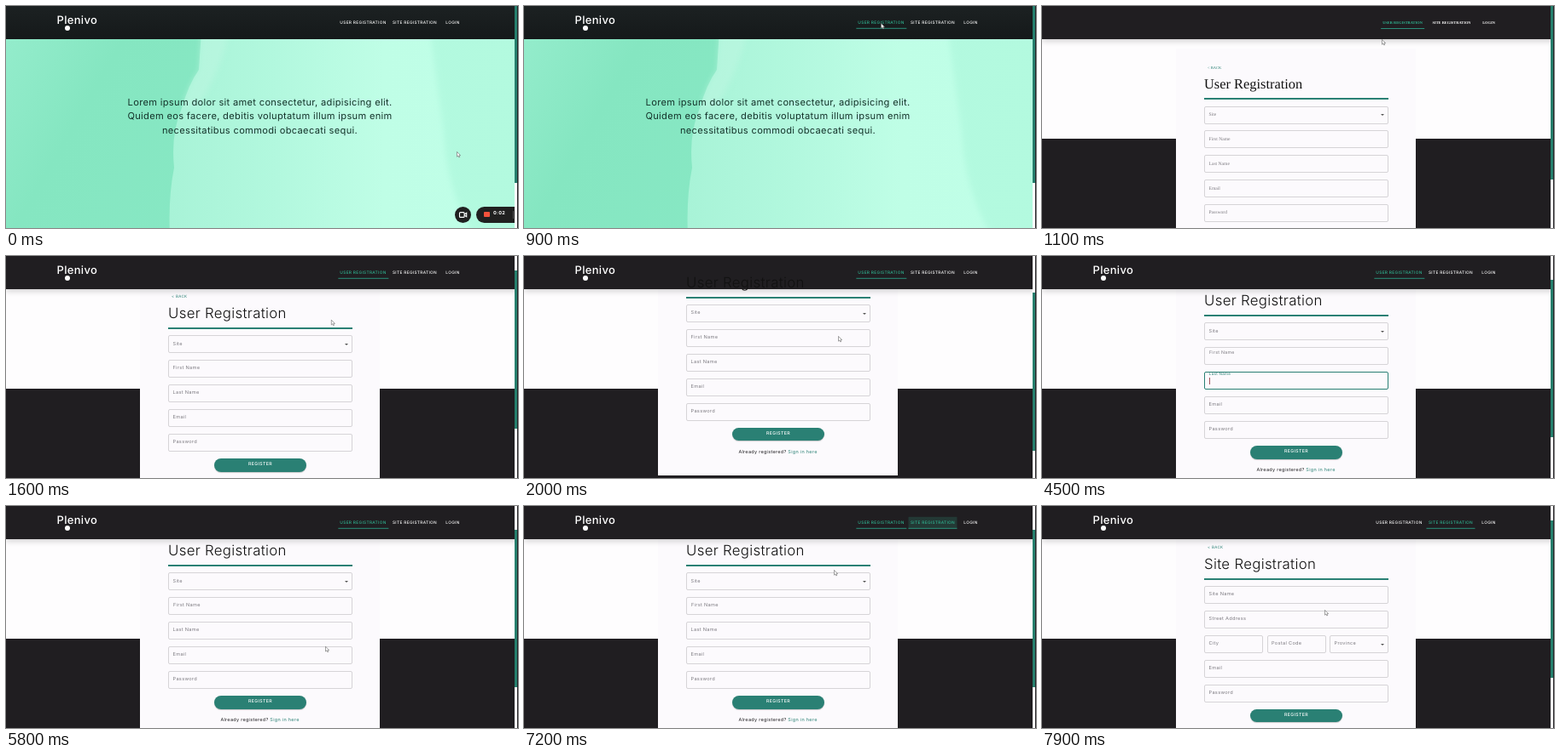
Write an HTML page that moves like this. It is 600 by 261 pixels and loops after 8000 ms.

```html
<!DOCTYPE html>
<html lang="en">
<head>
<meta charset="utf-8">
<title>Registration walkthrough</title>
<style>
  html, body { margin: 0; width: 100%; height: 100%; overflow: hidden; }
  #stage {
    position: relative; width: 600px; height: 261px; overflow: hidden;
    font-family: Inter, sans-serif; letter-spacing: .02em; color: #1c1b1d;
    text-rendering: geometricPrecision;
    background: linear-gradient(#fefdfe 156px, #201e21 156px);
  }
  #stage * { position: absolute; box-sizing: border-box; }
  .t { white-space: nowrap; line-height: 1; transform: translateY(-50%); }
  .mid { transform: translate(-50%, -50%); }
  #home, #home svg { inset: 0; }
  #home .t { left: 297.5px; font-size: 11.1px; color: #14332a; }
  .page { left: 0; top: 0; width: 600px; }
  .card { left: 157px; top: 50px; width: 281px; height: 268px; background: #fcfafd; }
  .back { left: 194px; top: 73px; font-size: 4.5px; color: #2a8074; }
  .title { left: 190px; font-size: 16.8px; font-weight: 300; color: #111; }
  .rule { left: 190px; top: 108px; width: 215.5px; height: 2px; background: #2a8074; }
  .field { height: 21px; border: 1px solid #d6d4d7; border-radius: 2px; }
  .label { left: 3.5px; top: 10.2px; padding: 0 1px; font-size: 5.6px; color: #7d7b80;
           transform-origin: 0 50%; }
  .arrow { right: 4.5px; top: 8.7px; border: 2px solid transparent; border-top-color: #555; }
  .caret { left: 4.5px; top: 6px; width: 1px; height: 7.5px; background: #a0525c; }
  .field.on { border-color: #2a8074; }
  .field.on .label { color: #2a8074; }
  .button { left: 244px; width: 108px; height: 15.5px; border-radius: 8px;
            background: #2a8074; box-shadow: 0 1px 1px #0003; }
  .button .t { left: 50%; top: 50%; font-size: 5.25px; font-weight: 500; color: #fff; }
  .signin { left: 297.5px; top: 292px; font-size: 5.45px; }
  .signin span { position: static !important; color: #2a8074; }
  #menu { left: 190px; top: 100px; width: 216px; height: 6px; background: #fff;
          border-radius: 1px; box-shadow: 0 2px 4px #0006; }
  #header { left: 0; top: 0; width: 600px; height: 39px; background: #201e21;
            box-shadow: 0 2px 7px #0003; }
  #header.dark { background: linear-gradient(#1c2122, #15191a); box-shadow: none; }
  #logo { inset: 0; color: #fff; }
  #logo .t { left: 59.5px; top: 16.5px; font-size: 13px; font-weight: 500; }
  #logo i { left: 69px; top: 22.5px; width: 6px; height: 6px; border-radius: 50%; background: #fff; }
  .nav { top: 20px; padding: 4px 2.5px 3.6px; font-size: 4.8px; font-weight: 500; color: #fff;
         border-bottom: 1px solid transparent; border-top: 1px solid transparent; }
  .nav.on { color: #2fb592; border-bottom-color: #2a8e78; }
  .nav.tint { background: #2fa38633; }
  .serif { font-family: "Liberation Serif", serif !important; letter-spacing: 0 !important; }
  .serif .nav { font-size: 4.4px; font-weight: 700; }
  .serif .title { font-size: 16.4px; font-weight: 400; }
  #track { left: 595.5px; bottom: 0; width: 3.5px; background: #fdfdfd; }
  #edge { left: 599px; top: 0; width: 1px; height: 261px; background: #252326; }
  #thumb { left: 0; width: 100%; background: #26806e; }
  #cam { left: 526px; top: 235.5px; width: 19px; height: 19px; border-radius: 50%; background: #202020; }
  #rec { left: 551px; top: 235.5px; width: 44.5px; height: 19px; border-radius: 9.5px 0 0 9.5px; background: #202020; }
  #rec i { left: 9px; top: 6.3px; width: 6.6px; height: 6.6px; border-radius: 1px; background: #f4523c; }
  #rec b { left: 20px; top: 9.9px; font-size: 5.6px; color: #fff; }
  #rec u { left: 43px; top: 5px; width: 1px; height: 9px; background: #555; }
  #pointer { left: 0; top: 0; width: 6px; height: 8px; overflow: visible; }
</style>
</head>
<body>
<div id="stage">
  <div id="home">
    <svg viewBox="0 0 600 261">
      <defs>
        <linearGradient id="deep" x2="1" y2=".25">
          <stop stop-color="#96edcd"/><stop offset=".25" stop-color="#85e6c1"/><stop offset="1" stop-color="#8aeac7"/>
        </linearGradient>
        <linearGradient id="pale">
          <stop stop-color="#a8f3d7"/><stop offset=".3" stop-color="#b2f8de"/>
          <stop offset=".6" stop-color="#bffee6"/><stop offset="1" stop-color="#c0ffe8"/>
        </linearGradient>
        <filter id="soft"><feGaussianBlur stdDeviation="3"/></filter>
      </defs>
      <rect width="600" height="261" fill="url(#deep)"/>
      <path d="M229 30 L226 75 Q214 92 206 120 Q193 150 197 190 Q190 225 192 270 H610 V30 Z" fill="url(#pale)"/>
      <path d="M229 30 L226 75 Q214 92 206 120 L225 118 Q250 80 262 30 Z" fill="#c0f7e2" opacity=".5" filter="url(#soft)"/>
      <path d="M497 30 Q505 90 513 150 Q516 215 548 270 H610 V30 Z" fill="#a9f6d9" opacity=".55" filter="url(#soft)"/>
    </svg>
    <div class="t mid" style="top:113.5px">Lorem ipsum dolor sit amet consectetur, adipisicing elit.</div>
    <div class="t mid" style="top:130px">Quidem eos facere, debitis voluptatum illum ipsum enim</div>
    <div class="t mid" style="top:146.5px">necessitatibus commodi obcaecati sequi.</div>
  </div>
  <div id="pages"></div>
  <div id="menu"></div>
  <div id="header"><div id="logo"><div class="t">Plenivo</div><i></i></div></div>
  <div id="titles"></div>
  <div id="track"><div id="thumb"></div></div>
  <div id="edge"></div>
  <div id="widget">
    <div id="cam">
      <svg style="inset:0" viewBox="0 0 19 19" fill="none" stroke="#fff" stroke-width="1.1">
        <rect x="5.5" y="6.6" width="5.6" height="5.8" rx="1"/><path d="M11.2 9 L13.7 7.2 V11.8 L11.2 10"/>
      </svg>
    </div>
    <div id="rec"><i></i><b class="t" id="clock"></b><u></u></div>
  </div>
  <svg id="pointer" viewBox="0 0 6 8">
    <path d="M.5 .4 V6.2 L1.9 5 L2.8 7 L3.7 6.6 L2.9 4.7 L4.6 4.6 Z" fill="#fff" stroke="#666" stroke-width=".6"/>
  </svg>
</div>
<script>
const LOOP = 8000, STEP = 100, VIEW = 261, HEADER = 39;
const $ = id => document.getElementById(id);

function add(parent, cls, style = {}, text = '') {
  const e = document.createElement('div');
  e.className = cls;
  e.textContent = text;
  for (const k in style) e.style[k] = typeof style[k] === 'number' ? style[k] + 'px' : style[k];
  return parent.appendChild(e);
}

function addField(page, [name, row, left = 190, width = 216, select = false]) {
  const box = add(page, 'field', { left, width, top: 117.5 + row * 28.95 });
  const label = add(box, 't label', {}, name);
  if (select) add(box, 'arrow');
  const caret = select ? null : add(box, 'caret');
  return { box, label, caret };
}

function makePage(heading, fields) {
  const page = add($('pages'), 'page');
  add(page, 'card');
  add(page, 't back', {}, '< BACK');
  add(page, 'rule');
  const list = fields.map(f => addField(page, f));
  const button = add(page, 'button', { top: 262.3 });
  add(button, 't mid', {}, 'REGISTER');
  const signin = add(page, 't mid signin', {}, 'Already registered? ');
  const link = document.createElement('span');
  link.textContent = 'Sign in here';
  signin.append(link);
  const title = add($('titles'), 't title', {}, heading);
  return { page, title, list };
}

const user = makePage('User Registration', [
  ['Site', 0, 190, 216, true], ['First Name', 1], ['Last Name', 2], ['Email', 3], ['Password', 4]]);
const site = makePage('Site Registration', [
  ['Site Name', 0], ['Street Address', 1], ['City', 2, 190, 69], ['Postal Code', 2, 263.5, 69],
  ['Province', 2, 337, 69, true], ['Email', 3], ['Password', 4]]);

const navX = [418.5, 479, 523.5], serifX = [422.5, 480, 523.5];
const nav = ['USER REGISTRATION', 'SITE REGISTRATION', 'LOGIN']
  .map(name => add($('header'), 't mid nav', {}, name));

// Each row: time, then the values reached at that time.
const pointerPath = [
  [0, 528, 171], [300, 490, 110], [700, 428, 26], [900, 418, 20], [1000, 414, 22], [1100, 398, 39],
  [1500, 384, 70], [2000, 368, 94], [2400, 362, 90], [2600, 362, 90], [2900, 350, 85], [3500, 350, 85],
  [3850, 330, 117], [5400, 330, 225], [5700, 350, 200], [6200, 470, 24], [6900, 478, 20],
  [7000, 470, 24], [7200, 363, 75], [7600, 345, 105], [7900, 331, 122]];
const scrollPath = [
  [1400, 0], [1900, 60.5], [2100, 60.5], [2400, 39.2], [7299, 39.2], [7300, 0], [7500, 0], [7800, 23.4]];
const focusTimes = [[2650, 3850], [3850, 4415], [4415, 4750], [4750, 5050], [5050, 5600]];

const clamp = x => Math.min(1, Math.max(0, x));
const within = (t, a, b) => t >= a && t < b;

function follow(path, t) {
  const i = path.findIndex(p => p[0] > t);
  if (i === 0) return path[0].slice(1);
  if (i < 0) return path[path.length - 1].slice(1);
  const a = path[i - 1], b = path[i], k = (t - a[0]) / (b[0] - a[0]);
  return a.slice(1).map((v, j) => v + (b[j + 1] - v) * k);
}

const easeOut = x => 1 - (1 - clamp(x)) ** 2.4;
const show = (e, on) => { e.style.display = on ? '' : 'none'; };

function drawFocus({ box, label, caret }, t, [from, to]) {
  const on = within(t, from, to);
  const lift = easeOut((t - from) / 200) - easeOut((t - to) / 200);
  box.classList.toggle('on', on);
  label.style.transform = `translateY(calc(-50% - ${10.3 * lift}px)) scale(${1 - .25 * lift})`;
  label.style.background = lift > .3 ? '#fcfafd' : 'none';
  if (caret) show(caret, on);
}

function draw(t) {
  const home = t < 1000, onSite = t >= 7300, serif = within(t, 1000, 1250);
  const menu = clamp((t - 2700) / 150) - clamp((t - 3600) / 150);
  const locked = menu > 0;
  const [scroll] = follow(scrollPath, t);

  show($('home'), home);
  for (const p of [user, site]) {
    const on = !home && (p === site) === onSite;
    show(p.page, on);
    show(p.title, on);
    p.page.style.top = -scroll + 'px';
    p.title.style.top = 92 - scroll + 'px';
  }
  $('stage').classList.toggle('serif', serif);
  $('header').classList.toggle('dark', home);
  show($('logo'), !serif);

  const active = [within(t, 700, 7300), t >= 6200, false];
  nav.forEach((e, i) => {
    e.style.left = (serif ? serifX : navX)[i] + (locked ? 3.5 : 0) + 'px';
    e.classList.toggle('on', active[i]);
  });
  nav[1].classList.toggle('tint', within(t, 6200, 7300));

  user.list.forEach((f, i) => drawFocus(f, t, focusTimes[i]));
  site.list.forEach(f => f.caret && show(f.caret, false));
  $('menu').style.opacity = menu;

  const content = home ? 327 : serif ? 334 : 367;
  $('thumb').style.height = VIEW * VIEW / content + 'px';
  $('thumb').style.top = scroll * VIEW / content + 'px';
  show($('thumb'), !locked);
  $('track').style.top = (locked ? HEADER : 0) + 'px';

  $('widget').style.opacity = 1 - clamp((t - 500) / 300);
  $('clock').textContent = t < 500 ? '0:02' : '0:03';

  const [x, y] = follow(pointerPath, t);
  $('pointer').style.transform = `translate(${x}px, ${y}px)`;
  show($('pointer'), !within(t, 4000, 5400));
}

function tick() {
  const t = performance.now() % LOOP;
  draw(Math.floor(t / STEP) * STEP);
  requestAnimationFrame(tick);
}
tick();
</script>
</body>
</html>
```
